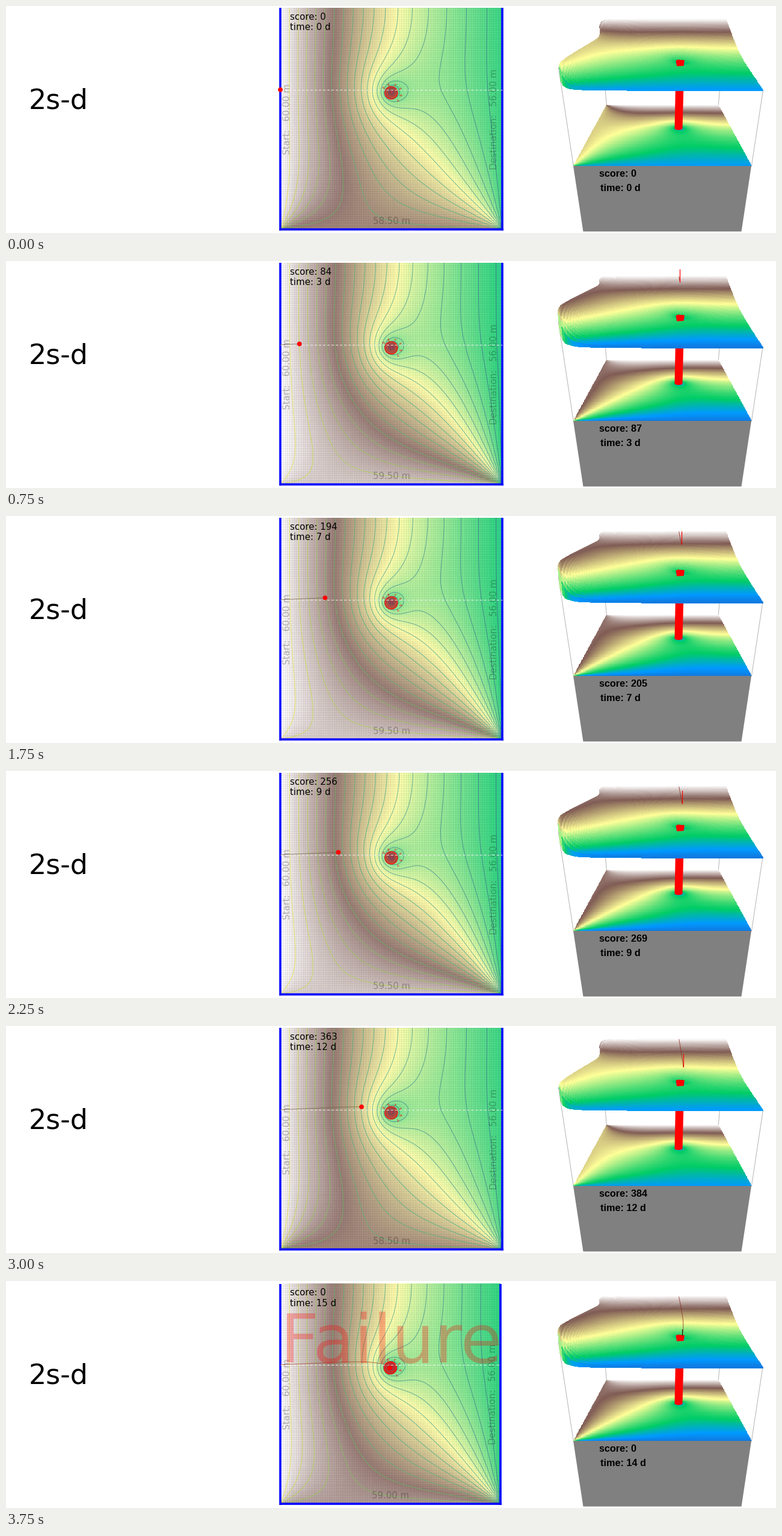
Write a matplotlib script that moves like this. It is 1280x379 px and loops after 4 s.

```python
import numpy as np
import matplotlib.pyplot as plt
from matplotlib.animation import FuncAnimation
from matplotlib.patches import Circle, Ellipse

W, H, DPI = 1280, 379, 100
PT = 72 / DPI
N = 100
WELL = (0.5, 0.62)
RATE = 3.3
END = 14  # day the particle reaches the well

SCORE_DAYS = [0, 3, 7, 9, 12, 14]
MAP_SCORE = [0, 84, 194, 256, 363, 461]
BLOCK_SCORE = [0, 87, 205, 269, 384, 488]

axis = np.linspace(0, 1, N)
k = np.arange(1, 400)[:, None] * np.pi
sines = np.sin(k * axis)
norm = 1 + np.exp(-2 * k)
fade = (np.exp(-k * axis) + np.exp(-k * (2 - axis))) / norm


def drawdown():
    """Series solution for one well between fixed heads, closed at the top."""
    m = k[:99]
    lo, hi = np.minimum(axis, WELL[1]), np.maximum(axis, WELL[1])
    g = (np.exp(-m * (hi - lo)) - np.exp(-m * (hi + lo))
         + np.exp(-m * (2 - hi - lo)) - np.exp(-m * (2 - hi + lo)))
    amp = np.sin(m * WELL[0]) / m / norm[:99]
    return (amp * g).T @ sines[:99]


PUMPED = RATE * drawdown()


def heads(base):
    """Heads on the grid, rows from the lower side upward."""
    sign = np.cos(k)
    amp = 2 * ((base - 60) * (1 - sign) - 4 * sign) / k
    h = 60 - 4 * axis + (amp * fade).T @ sines - PUMPED
    h[0] = base
    h[:, 0], h[:, -1] = 60, 56
    return h


def centers(a):
    return (a[1:, 1:] + a[1:, :-1] + a[:-1, 1:] + a[:-1, :-1]) / 4


def side_head(day):
    """Head set on the lower side, in steps of half a metre."""
    trend = np.interp(day, [0, 3, 9, 12, 14, 15], [-1, 1, 1, -1, 1, 0])
    dip = day < 12 and day % 3 == 2
    return 59 if dip else 59 + round(trend) / 2


def particle(t):
    """Slow drift that speeds up and bends down close to the well."""
    s = t / END
    x = 456 + 10.6 * t + 23 * s ** 7
    y = 139.8 - 0.45 * t + 5.3 * s ** 14
    return np.minimum(x, 638), np.minimum(y, 145)


def project(u, v, z):
    """u: left to right, v: back to front, z: height above the block."""
    w = 0.003378 + 0.001998 * (1 - v) - 0.000424 * z
    y = (0.902 - 0.015 * (1 - v) - 0.5277 * z) / w
    return 1091.3 + (u - 0.5) / w, y


fig = plt.figure(figsize=(W / DPI, H / DPI), dpi=DPI, facecolor="white")
ax = fig.add_axes([0, 0, 1, 1])


def line(x, y, color, width=1.0, **kw):
    ax.plot(x, y, color=color, lw=width * PT, **kw)


def label(x, y, s, size, **kw):
    kw.setdefault("family", "DejaVu Sans")
    kw.setdefault("va", "baseline")
    ax.text(x, y, s, fontsize=size * PT, zorder=9, **kw)


def draw_well(x, y, alpha):
    ax.add_patch(Circle((x, y), 11, fc="red", ec="none", alpha=alpha, zorder=2))
    ax.add_patch(Circle((x, y), 10.5, fc="none", ec="red", lw=1.1 * PT,
                        alpha=0.8, zorder=3))
    for i, a in enumerate(np.linspace(215, 410, 6)):
        r = np.radians(a)
        label(x + 15 * np.cos(r), y + 14 * np.sin(r), str(5 + i % 3), 6,
              color="red", ha="center", va="center", rotation=-a - 90)


def draw_map(day):
    base = side_head(day)
    failed = day > END
    left, right = 456.3, (822 if failed else 825)
    top, bottom = (4.5, 372) if failed else (3, 373)
    low = 54.59 + 0.18 * (base - 58.5)
    h = heads(base)

    ax.imshow(centers(h)[::-1], cmap="terrain", vmin=low, vmax=60, alpha=0.8,
              extent=(left, right, bottom, top), aspect="auto",
              interpolation="nearest", zorder=0)
    xs = left + (right - left) * axis
    ys = bottom - (bottom - top) * axis
    mesh = dict(color="black", alpha=0.09, lw=0.6 * PT, zorder=1)
    ax.vlines(xs, top, bottom, **mesh)
    ax.hlines(ys, left, right, **mesh)
    ax.contour(xs, ys, h, levels=np.linspace(low, 60, 25), cmap="viridis",
               linewidths=1.0 * PT, alpha=0.62, zorder=3)
    draw_well((left + right) / 2 - 0.3, 145, 0.85 if failed else 0.68)

    edge = dict(color="blue", width=3.6, zorder=6, solid_capstyle="butt")
    for x in (left, right):
        line([x, x], [top, bottom + 1.8], **edge)
    line([left - 1.8, right + 1.8], [bottom, bottom], **edge)
    line([left, right], [139.8, 139.8], "white", 1.1, alpha=0.8, zorder=7,
         dashes=(4, 2.4))

    px, py = particle(np.linspace(0, day, 60))
    line(px, py, "#a03c28" if failed else "#6e5a3c", alpha=0.7, zorder=7)
    ax.add_patch(Circle((px[-1], py[-1]), 3.2, color="red", zorder=8))

    faint = dict(color="black", alpha=0.27, ha="center")
    upright = dict(rotation=90, va="center", **faint)
    label(467.5, 189, "Start:   60.00 m", 15, **upright)
    label(right - 13, 189, "Destination:   56.00 m", 15, **upright)
    label((left + right) / 2, bottom - 9, f"{base:.2f} m", 15, **faint)
    score = 0 if failed else round(np.interp(day, SCORE_DAYS, MAP_SCORE))
    label(472, top + 20, f"score: {score}", 15)
    label(472, top + 37, f"time: {day} d", 15)
    if failed:
        label(456, 135.5, "Failure", 112, color="red", alpha=0.28)


def draw_block(day):
    day = min(day, END)
    base = side_head(day) - 0.5
    t56 = 0.15 - 0.05 * (base - 58)
    low = 60 - 4 / (1 - t56)
    h = centers(heads(base)).T
    grid = np.linspace(0, 1, len(h))
    u, v = np.meshgrid(grid, grid)
    z56 = 0.910 - 0.026 * (base - 58)
    z60 = 1.483 - 0.037 * (base - 58)
    z = z56 + (np.maximum(h, low) - 56) / 4 * (z60 - z56)
    color = centers(h)

    for cu, cv, cz in ((0, 0, 1), (1, 0, 1), (0, 1, 1.15), (1, 1, 0.9)):
        (xa, ya), (xb, yb) = project(cu, cv, 0), project(cu, cv, cz)
        line([xa, xb], [ya, yb], "#b4b4b4", zorder=1)
    ax.fill([943, 1239, 1222.5, 959.5], [267, 267, 376.5, 376.5],
            color="#808080", lw=0, zorder=1)

    mesh = dict(cmap="terrain", vmin=low, vmax=60, antialiased=False)
    ax.pcolormesh(*project(u, v, 0 * z), color, zorder=2, **mesh)
    ax.add_patch(Ellipse((1118, 204.5), 13, 5, color="red", lw=0, zorder=3))
    ax.fill([1113, 1126.5, 1124.5, 1111.5], [130, 130, 204.5, 204.5],
            color="red", lw=0, zorder=3)
    ax.pcolormesh(*project(u, v, z), color, zorder=4, edgecolors="face",
                  linewidth=0.3, **mesh)
    ax.fill([1113.5, 1117, 1128, 1126.5, 1115], [91, 89.5, 90.5, 100, 100.5],
            color="red", lw=0, zorder=5)

    if day:
        x, y = particle(np.linspace(0, day, 40))
        pu, pv = (373 - y) / 370, (x - 456) / 369
        last = len(grid) - 1
        pz = z[(pv * last).astype(int), (pu * last).astype(int)]
        px, py = project(pu, pv, pz)
        py = np.minimum(py, 91)
        line(px, py, "#8c2d1e", 0.9, alpha=0.85, zorder=6)
        done = day == END
        line([px[-1]] * 2, [py[-1] - (10 if done else 21), py[-1]],
             "#28280a" if done else "red", 1.2, zorder=6)

    bold = dict(family="Liberation Sans", weight="bold")
    score = round(np.interp(day, SCORE_DAYS, BLOCK_SCORE)) if day < END else 0
    label(985.5, 285, f"score: {score}", 16.2, **bold)
    label(988, 309, f"time: {day} d", 16.2, **bold)


def draw(day):
    ax.clear()
    label(38, 172, "2s-d", 46)
    draw_map(day)
    draw_block(day)
    ax.set_xlim(0, W)
    ax.set_ylim(H, 0)
    ax.axis("off")
    return []


anim = FuncAnimation(fig, draw, frames=16, interval=250, repeat=True,
                     repeat_delay=0, init_func=lambda: [], blit=False)
plt.show()
```
